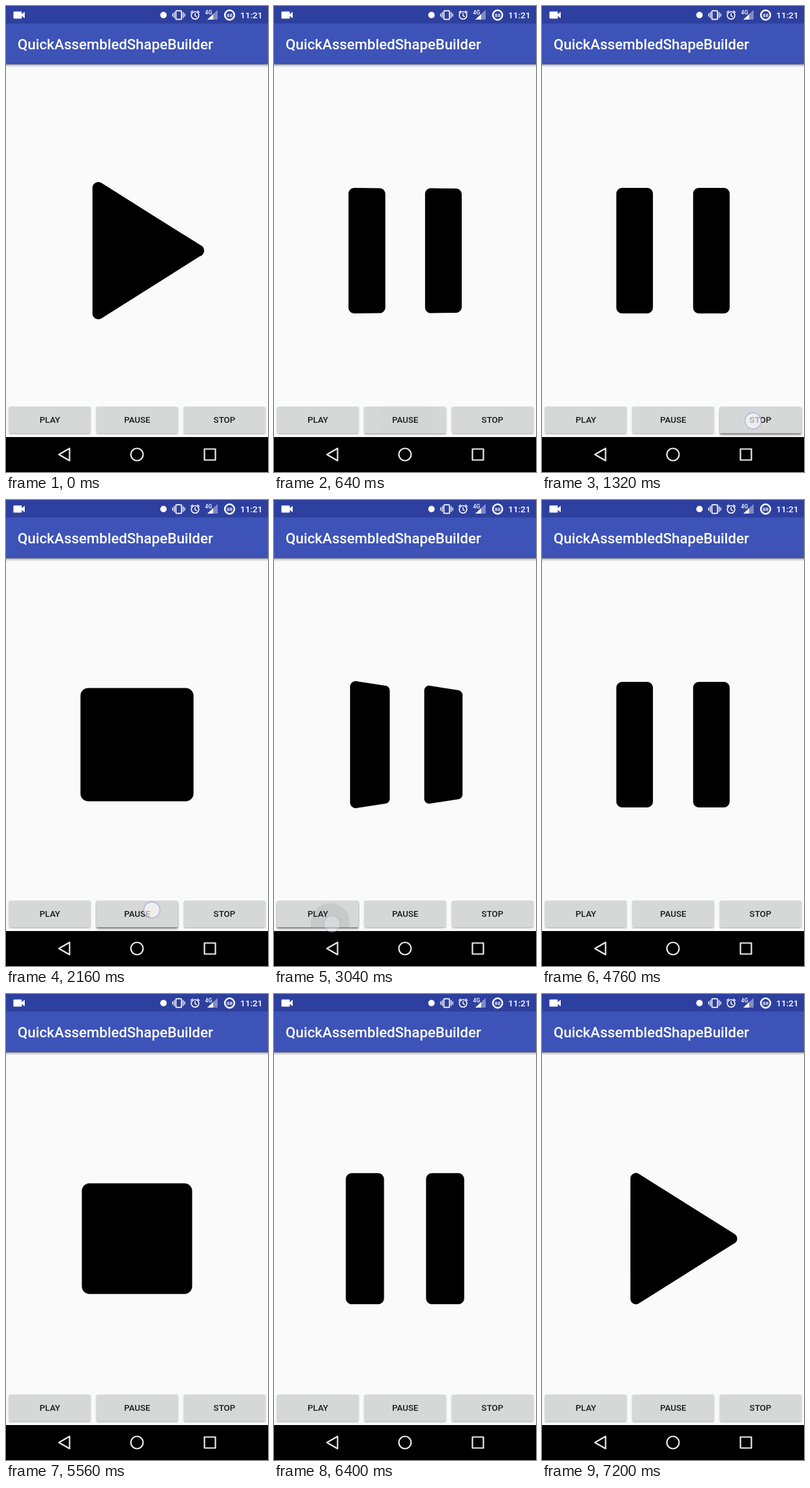
Recreate the animation shown at these times as an HTML page. Size 406 by 720 pixels, loop 7.24 s.

```html
<!DOCTYPE html>
<html lang="en">
<head>
<meta charset="utf-8">
<title>Play, pause, stop</title>
<style>
  html, body { margin: 0; width: 100%; height: 100%; overflow: hidden; background: #fafafa; }
  svg { display: block; width: 100vw; height: 100vh; }
  text { font-family: Roboto, "Noto Sans", sans-serif; font-weight: 500; fill: #fff; }
  .title { font-size: 22.4px; }
  .clock { font-size: 13.6px; }
  .label { font-size: 13.4px; fill: #1b1b1b; text-anchor: middle; }
  .line { fill: none; stroke: #fff; }
  .nav { fill: none; stroke: #ececec; stroke-width: 2.2; stroke-linejoin: round; }
</style>
</head>
<body>
<svg viewBox="0 0 406 720">
  <defs>
    <linearGradient id="shade" x2="0" y2="1">
      <stop offset="0" stop-color="#000" stop-opacity=".42"/>
      <stop offset=".4" stop-color="#000" stop-opacity=".15"/>
      <stop offset="1" stop-color="#000" stop-opacity="0"/>
    </linearGradient>
    <filter id="lift" x="-5%" y="-10%" width="110%" height="130%">
      <feDropShadow dx="0" dy="1.3" stdDeviation="1" flood-opacity=".3"/>
    </filter>
    <filter id="soft" x="-10%" y="-20%" width="120%" height="150%">
      <feGaussianBlur stdDeviation="1.8"/>
    </filter>
    <clipPath id="clip"><rect id="clipBox" y="619" width="126.5" height="41" rx="2"/></clipPath>
  </defs>

  <rect width="406" height="720" fill="#fafafa"/>
  <rect y="90" width="406" height="5" fill="url(#shade)"/>
  <rect y="27" width="406" height="63" fill="#3d53b7"/>
  <rect width="406" height="27" fill="#2e409f"/>
  <text class="title" x="18" y="67">QuickAssembledShapeBuilder</text>

  <!-- status icons -->
  <g fill="#fff">
    <rect x="11.5" y="8.5" width="13" height="11" rx="1.2"/>
    <path d="M24 13l5-4v10l-5-4z"/>
    <circle cx="244" cy="14" r="5"/>
    <rect class="line" x="263.3" y="7.3" width="8.6" height="13.4" rx="1" stroke-width="1.7"/>
    <path class="line" d="M260.7 9.5v9M258.3 11.5v5M274.5 9.5v9M276.9 11.5v5" stroke-width="1.4"/>
    <circle class="line" cx="293" cy="14.5" r="5.8" stroke-width="1.6"/>
    <path class="line" d="M293 11v4l2.7 1.7M286 10.3l3.6-3M300 10.3l-3.6-3" stroke-width="1.4"/>
    <path d="M312 21L328 6v15z" opacity=".4"/>
    <path d="M312 21L321 12.6V21z"/>
    <text x="308.5" y="12.6" font-size="8.6">4G</text>
    <circle class="line" cx="346.5" cy="14" r="7.4" stroke-width="2.5"/>
    <text x="346.5" y="17" font-size="8" text-anchor="middle">88</text>
    <text class="clock" x="363" y="19">11:21</text>
  </g>

  <path id="shape"/>

  <rect id="press" y="622" width="126.5" height="41" rx="2" filter="url(#soft)"/>
  <g fill="#d6d7d7" filter="url(#lift)">
    <rect x="4.5" y="619" width="126.5" height="41" rx="2"/>
    <rect x="140" y="619" width="126.5" height="41" rx="2"/>
    <rect x="275.5" y="619" width="126.5" height="41" rx="2"/>
  </g>
  <g clip-path="url(#clip)"><circle id="ripple"/></g>
  <text class="label" x="68" y="644">PLAY</text>
  <text class="label" x="203.3" y="644">PAUSE</text>
  <text class="label" x="338.5" y="644">STOP</text>

  <rect y="666" width="406" height="54" fill="#000"/>
  <path class="nav" d="M82 693L98.5 683.5V702.5z"/>
  <circle class="nav" cx="203" cy="693" r="9.5"/>
  <rect class="nav" x="307.5" y="684.5" width="17" height="17"/>

  <circle id="finger" r="12.5" fill="#fff" fill-opacity=".6" stroke="#a4a9d8" stroke-opacity=".8" stroke-width="1.4"/>
</svg>
<script>
const LOOP = 7240, CX = 203, CY = 378;
const $ = id => document.getElementById(id);
const clamp = v => Math.max(0, Math.min(1, v));
const ease = v => (1 - Math.cos(Math.PI * v)) / 2;

// One cubic arc as eight numbers; radius 0 gives a sharp corner.
function arc(cx, cy, r, from, to) {
  const a = from * Math.PI / 180, b = to * Math.PI / 180;
  const k = 4 / 3 * Math.tan((b - a) / 4);
  const [ca, sa, cb, sb] = [Math.cos(a), Math.sin(a), Math.cos(b), Math.sin(b)];
  return [
    cx + r * ca, cy + r * sa,
    cx + r * (ca - k * sa), cy + r * (sa + k * ca),
    cx + r * (cb + k * sb), cy + r * (sb - k * cb),
    cx + r * cb, cy + r * sb
  ];
}
const dot = (x, y) => arc(x, y, 0, 0, 90);

// Corners run clockwise from the top left.
const bar = (x0, x1, top, left, right) => {
  const bottom = 2 * CY - top;
  return [
    arc(x0 + left, top + left, left, 180, 270),
    arc(x1 - right, top + right, right, 270, 360),
    arc(x1 - right, bottom - right, right, 0, 90),
    arc(x0 + left, bottom - left, left, 90, 180)
  ];
};

const SEAM = 224.5, SEAM_Y = 56.5, TILT = 58;
const seamTop = dot(SEAM, CY - SEAM_Y), seamEnd = dot(SEAM, CY + SEAM_Y);
const shapes = {
  play: [
    [arc(143, 281, 9, 180, 360 - TILT), seamTop, seamEnd, arc(143, 475, 9, TILT, 180)],
    [seamTop, arc(298, CY, 9, -TILT, 75), dot(300.3, 386.8), seamEnd]
  ],
  pause: [bar(115.2, 171.9, 281, 9, 9), bar(234.2, 290.8, 281, 9, 9)],
  stop: [bar(115.4, CX, 290.5, 12, 0), bar(CX, 290.6, 290.5, 0, 12)]
};

// Touch time and place, morph start, new shape, morph length, bounce length.
const taps = [
  { at: 240, x: 230, y: 650, start: 315, to: 'pause', morph: 350, bounce: 270 },
  { at: 1320, x: 327, y: 641, start: 1370, to: 'stop', morph: 300, bounce: 200 },
  { at: 2160, x: 226, y: 633.5, start: 2215, to: 'pause', morph: 300, bounce: 200 },
  { at: 2920, x: 90, y: 655, start: 2967, to: 'play', morph: 300, bounce: 200 },
  { at: 4000, x: 234, y: 640, start: 4075, to: 'pause', morph: 350, bounce: 270 },
  { at: 5040, x: 330, y: 651, start: 5110, to: 'stop', morph: 300, bounce: 200 },
  { at: 5920, x: 226, y: 651, start: 5980, to: 'pause', morph: 300, bounce: 200 },
  { at: 6720, x: 88, y: 645, start: 6778, to: 'play', morph: 300, bounce: 200 }
];

function outline(from, to, p) {
  return from.map((half, h) => half.map((corner, c) => {
    const v = corner.map((n, i) => (n + (to[h][c][i] - n) * p).toFixed(2));
    return `${c ? 'L' : 'M'}${v[0]} ${v[1]}C${v.slice(2).join(' ')}`;
  }).join('') + 'Z').join('');
}

function set(id, attrs) {
  for (const name in attrs) $(id).setAttribute(name, attrs[name]);
}

function drawTouch(tap, t) {
  if (!tap) {
    for (const id of ['finger', 'ripple', 'press']) set(id, { opacity: 0 });
    return;
  }
  const age = t - tap.at;
  const left = 4.5 + Math.floor(tap.x / 135.5) * 135.5;
  const drift = clamp(age / 340) ** 2;
  set('finger', { cx: tap.x, cy: tap.y, opacity: clamp(1 - age / 420) ** 2 });
  set('press', { x: left, opacity: 0.3 * clamp((440 - age) / 150) });
  set('clipBox', { x: left });
  set('ripple', {
    cx: tap.x + (left + 63.5 - tap.x) * drift,
    cy: tap.y + (639.5 - tap.y) * drift,
    r: 54 * age / (age + 95),
    opacity: 0.065 * clamp((440 - age) / 320)
  });
}

function draw(t) {
  const i = taps.findLastIndex(tap => t >= tap.at);
  const tap = taps[i];
  const from = i > 0 ? taps[i - 1].to : 'play';
  let p = 0, scale = 1;
  if (tap) {
    const age = t - tap.start;
    p = ease(clamp(age / tap.morph));
    const swing = ease(2 * clamp((age - tap.morph) / tap.bounce));
    scale += (tap.to === 'pause' ? 0.05 : -0.05) * swing;
  }
  set('shape', {
    d: outline(shapes[from], shapes[tap ? tap.to : 'play'], p),
    transform: `translate(${CX} ${CY}) scale(${scale}) translate(${-CX} ${-CY})`
  });
  drawTouch(tap, t);
}

const begin = performance.now();
function tick() {
  draw((performance.now() - begin) % LOOP);
  requestAnimationFrame(tick);
}
tick();
</script>
</body>
</html>
```
